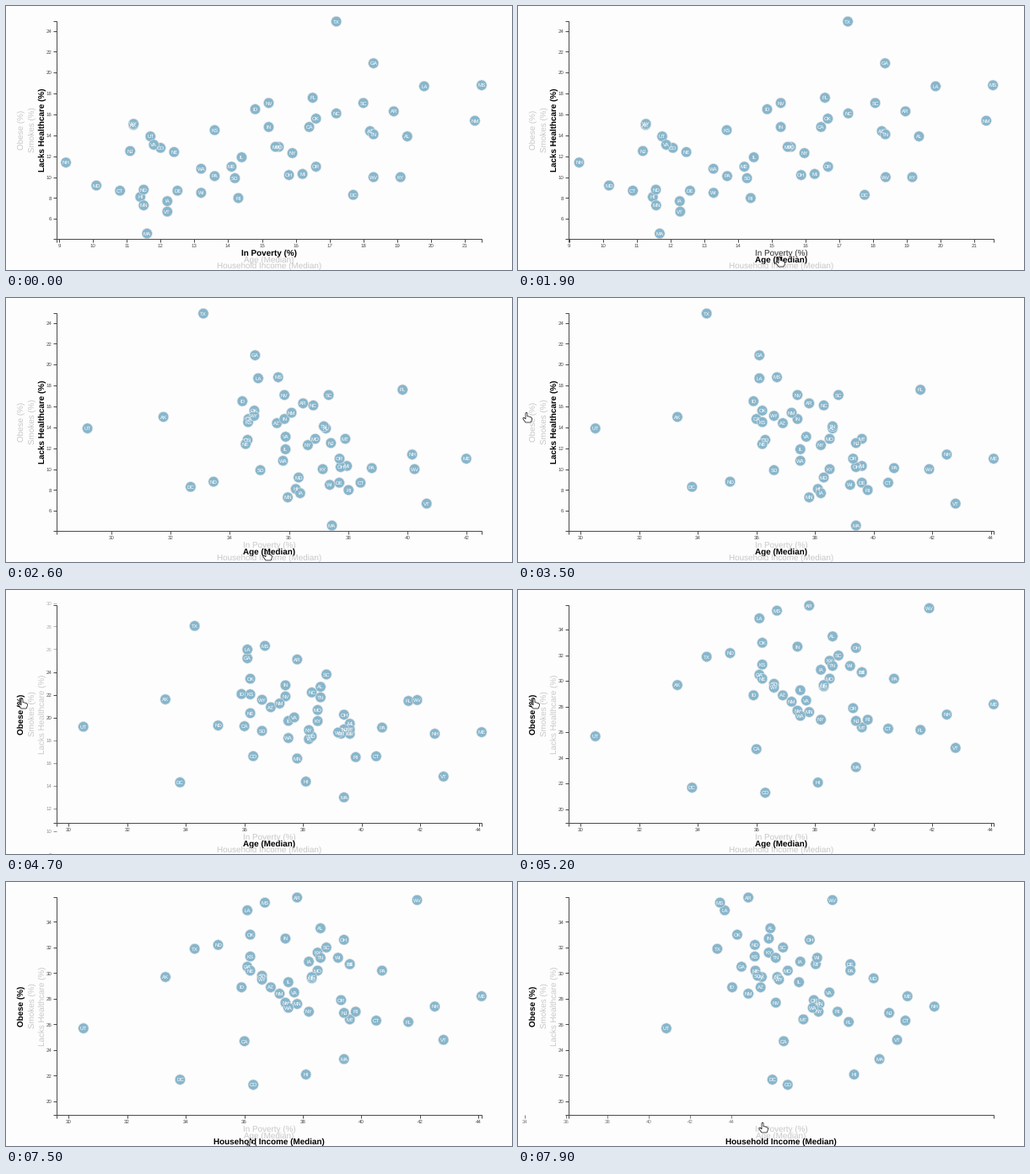
Write a matplotlib script that moves like this. It is 600 px wide and 314 px high and loops after 8 s.

```python
import numpy as np
import matplotlib.pyplot as plt
from matplotlib.animation import FuncAnimation
from matplotlib.collections import EllipseCollection
from matplotlib.patches import Polygon

W, H, DPI = 600, 314, 100
STEP, FRAMES = 100, 80
LEFT, RIGHT, TOP, BOTTOM = 60, 564, 18.4, 276.9
MID_X, MID_Y = 312, 147.5
PAPER, DOT, INK, PALE = "#fdfdfd", "#87b6cc", "#4c4c4c", "#c8c8c8"

plt.rcParams["font.family"] = "Liberation Sans"
plt.rcParams["text.hinting"] = "none"

STATES = ("AL AK AZ AR CA CO CT DE DC FL GA HI ID IL IN IA KS KY LA ME MD MA MI "
          "MN MS MO MT NE NV NH NJ NM NY NC ND OH OK OR PA RI SC SD TN TX UT VT "
          "VA WA WV WI WY").split()
POVERTY = [19.3, 11.2, 18.2, 18.9, 16.4, 12, 10.8, 12.5, 17.7, 16.5, 18.3, 11.4, 14.8,
           14.4, 15.2, 12.2, 13.6, 19.1, 19.8, 14.1, 10.1, 11.6, 16.2, 11.5, 21.5, 15.5,
           15.4, 12.4, 15.2, 9.2, 11.1, 21.3, 15.9, 17.2, 11.5, 15.8, 16.6, 16.6, 13.6,
           14.3, 18, 14.2, 18.3, 17.2, 11.7, 12.2, 11.8, 13.2, 18.3, 13.2, 11.2]
AGE = [38.6, 33.3, 36.9, 37.8, 36, 36.3, 40.5, 39.6, 33.8, 41.6, 36.1, 38.1, 35.9,
       37.5, 37.4, 38.2, 36.2, 38.5, 36.1, 44.1, 38.3, 39.4, 39.6, 37.8, 36.7, 38.5,
       39.6, 36.2, 37.4, 42.5, 39.4, 37.2, 38.2, 38.3, 35.1, 39.4, 36.2, 39.3, 40.7,
       39.8, 38.8, 36.6, 38.6, 34.3, 30.5, 42.8, 37.7, 37.5, 41.9, 39.2, 36.6]
INCOME = [42830, 71583, 50068, 41262, 61933, 61303, 70048, 59716, 71648, 47463, 49321,
          69592, 47861, 57444, 49446, 53712, 52504, 42958, 44555, 49462, 73971, 69160,
          49847, 61481, 39680, 48363, 46328, 52686, 51450, 66532, 71919, 44803, 58878,
          46556, 59029, 49308, 47529, 51075, 53234, 54891, 45238, 50979, 44361, 53035,
          60922, 54166, 64902, 61366, 41059, 52622, 57055]
HEALTH = [13.9, 15, 14.4, 16.3, 14.8, 12.8, 8.7, 8.7, 8.3, 17.6, 20.9, 8.1, 16.5,
          11.9, 14.8, 7.7, 14.5, 10, 18.7, 11, 9.2, 4.6, 10.3, 7.3, 18.8, 12.9,
          12.9, 12.4, 17.1, 11.4, 12.5, 15.4, 12.3, 16.1, 8.8, 10.2, 15.6, 11, 10.1,
          8, 17.1, 9.9, 14.1, 24.9, 13.9, 6.7, 13.1, 10.8, 10, 8.5, 15.1]
OBESE = [33.5, 29.7, 28.9, 35.9, 24.7, 21.3, 26.3, 30.7, 21.7, 26.2, 30.5, 22.1, 28.9,
         29.3, 32.7, 30.9, 31.3, 31.6, 34.9, 28.2, 29.6, 23.3, 30.7, 27.6, 35.5, 30.2,
         26.4, 30.2, 27.7, 27.4, 26.9, 28.4, 27, 29.7, 32.2, 32.6, 33, 27.9, 30.2,
         27, 32, 29.8, 31.2, 31.9, 25.7, 24.8, 28.5, 27.3, 35.7, 31.2, 29.5]


class Field:
    """A data column with its linear scale and tick values."""

    def __init__(self, label, values, pad, ticks, start, end):
        self.label, self.ticks = label, set(ticks)
        self.values = np.array(values, float)
        self.low = self.values.min() * pad
        self.slope = (end - start) / (self.values.max() - self.low)
        self.start = start

    def at(self, v):
        return self.start + (v - self.low) * self.slope


X_FIELDS = [
    Field("In Poverty (%)", POVERTY, 0.97, range(9, 22), LEFT, RIGHT),
    Field("Age (Median)", AGE, 0.97, range(30, 45, 2), LEFT, RIGHT),
    Field("Household Income (Median)", INCOME, 0.97, range(40000, 74000, 5000), LEFT, RIGHT),
]
Y_FIELDS = [
    Field("Lacks Healthcare (%)", HEALTH, 0.89, range(6, 25, 2), BOTTOM, TOP),
    Field("Obese (%)", OBESE, 0.89, range(20, 35, 2), BOTTOM, TOP),
]

# Click times in ms and the length of each transition.
X_CLICKS, Y_CLICKS, GLIDE = [1801, 7455], [4207], 1063

# label, first and last ms of hovering
HOVERS = [
    ("Household Income (Median)", 800, 1000),
    ("Age (Median)", 1100, 1800),
    ("In Poverty (%)", 1900, 2100),
    ("Obese (%)", 3600, 4200),
    ("Smokes (%)", 5500, 5700),
    ("Household Income (Median)", 6400, 7400),
]

# pointer path: ms, x, y
PATH = np.array([
    (600, 335, 322), (900, 325, 309), (1400, 310, 298), (1900, 310, 298),
    (2300, 309, 300), (2600, 309, 300), (3500, 10, 136), (3700, 10, 136),
    (4100, 19, 129), (5300, 19, 129), (5500, 24, 135), (5700, 24, 135),
    (6400, 360, 308), (6700, 360, 308), (7200, 290, 306), (7500, 290, 306),
    (7900, 290, 286),
])
HAND = np.array([(-1, 1), (0, 0), (1, 1), (1, 4.5), (5, 5.5), (6.5, 7), (6, 10),
                 (5, 12), (-1, 12), (-4, 8), (-4, 6.5), (-2.5, 6.5), (-1, 8)])
ARROW = np.array([(0, 0), (0, 10), (2.3, 8), (4, 11.5), (5.5, 11), (4, 7.3), (7, 7.3)])


def pt(px):
    return px * 72 / DPI


def ease(t):
    t = min(max(t, 0), 1)
    return 4 * t**3 if t < 0.5 else 1 - 4 * (1 - t) ** 3


def stage(fields, clicks, ms):
    """Fields before and after the latest click, and progress between them."""
    n = sum(ms >= c for c in clicks)
    if n == 0:
        return fields[0], fields[0], 1
    return fields[n - 1], fields[n], ease((ms - clicks[n - 1]) / GLIDE)


fig = plt.figure(figsize=(W / DPI, H / DPI), dpi=DPI, facecolor=PAPER)
ax = fig.add_axes([0, 0, 1, 1])
ax.set_xlim(0, W)
ax.set_ylim(H, 0)
ax.axis("off")

# axis lines with their outer ticks
LINE = dict(color=INK, lw=pt(1), solid_capstyle="butt", solid_joinstyle="miter")
ax.plot([LEFT, LEFT, RIGHT, RIGHT], [281, 277, 277, 281], **LINE)
ax.plot([56.3, LEFT, LEFT, 56.3], [277, 277, TOP, TOP], **LINE)


def make_ticks(fields, ha):
    values = sorted(set().union(*(f.ticks for f in fields)))
    return [(v, ax.plot([], [], **LINE)[0],
             ax.text(0, 0, f"{v:,}", size=pt(6.15), color=INK, ha=ha))
            for v in values]


x_ticks = make_ticks(X_FIELDS, "center")
y_ticks = make_ticks(Y_FIELDS, "right")

n = len(STATES)
dots = EllipseCollection([12.3] * n, [12.3] * n, [0] * n, units="x",
                         offsets=np.zeros((n, 2)), offset_transform=ax.transData,
                         facecolors=DOT, edgecolors="#e3e3e3", linewidths=pt(0.6), zorder=3)
ax.add_collection(dots)
names = [ax.text(0, 0, s, size=pt(6.2), color="white", ha="center", zorder=4)
         for s in STATES]

labels = {}
for i, f in enumerate(X_FIELDS):
    labels[f.label] = ax.text(MID_X, 297.3 + 7.55 * i, f.label, size=pt(9.84),
                              ha="center", zorder=5)
for i, s in enumerate(["Lacks Healthcare (%)", "Smokes (%)", "Obese (%)"]):
    labels[s] = ax.text(45.9 - 12.3 * i, MID_Y, s, size=pt(9.84), ha="center",
                        va="baseline", rotation=90, rotation_mode="anchor", zorder=5)

pointer = Polygon(HAND, closed=True, fc="white", ec="black", lw=pt(0.7), zorder=6)
ax.add_patch(pointer)


def move_ticks(ticks, old, new, p, horizontal):
    for v, line, text in ticks:
        alpha = (v in old.ticks) * (1 - p) + (v in new.ticks) * p
        q = old.at(v) * (1 - p) + new.at(v) * p
        seen = alpha > 0.01 and -20 < q < W + 20
        line.set_visible(seen)
        text.set_visible(seen)
        if not seen:
            continue
        line.set_alpha(alpha)
        text.set_alpha(alpha)
        if horizontal:
            line.set_data([q, q], [277, 280.7])
            text.set_position((q, 286.9))
        else:
            line.set_data([56.3, LEFT], [q, q])
            text.set_position((54.5, q + 2.1))


def draw(frame):
    ms = frame * STEP
    x0, x1, px = stage(X_FIELDS, X_CLICKS, ms)
    y0, y1, py = stage(Y_FIELDS, Y_CLICKS, ms)
    move_ticks(x_ticks, x0, x1, px, True)
    move_ticks(y_ticks, y0, y1, py, False)

    x = x0.at(x0.values) * (1 - px) + x1.at(x1.values) * px
    y = y0.at(y0.values) * (1 - py) + y1.at(y1.values) * py
    dots.set_offsets(np.column_stack([x, y]))
    for name, cx, cy in zip(names, x, y):
        name.set_position((cx, cy + 2.2))

    hovered = {s for s, a, b in HOVERS if a <= ms <= b}
    for s, text in labels.items():
        active = s in (x1.label, y1.label)
        text.set_weight("bold" if active else "normal")
        text.set_color("black" if active else "#2a2a2a" if s in hovered else PALE)

    tip = [np.interp(ms, PATH[:, 0], PATH[:, k]) for k in (1, 2)]
    on_label = tip[0] < 48 or tip[1] > 284
    pointer.set_xy((HAND if on_label else ARROW) + tip)
    return []


anim = FuncAnimation(fig, draw, frames=FRAMES, interval=STEP, repeat=True,
                     repeat_delay=0, init_func=lambda: draw(0), blit=False)
plt.show()
```
